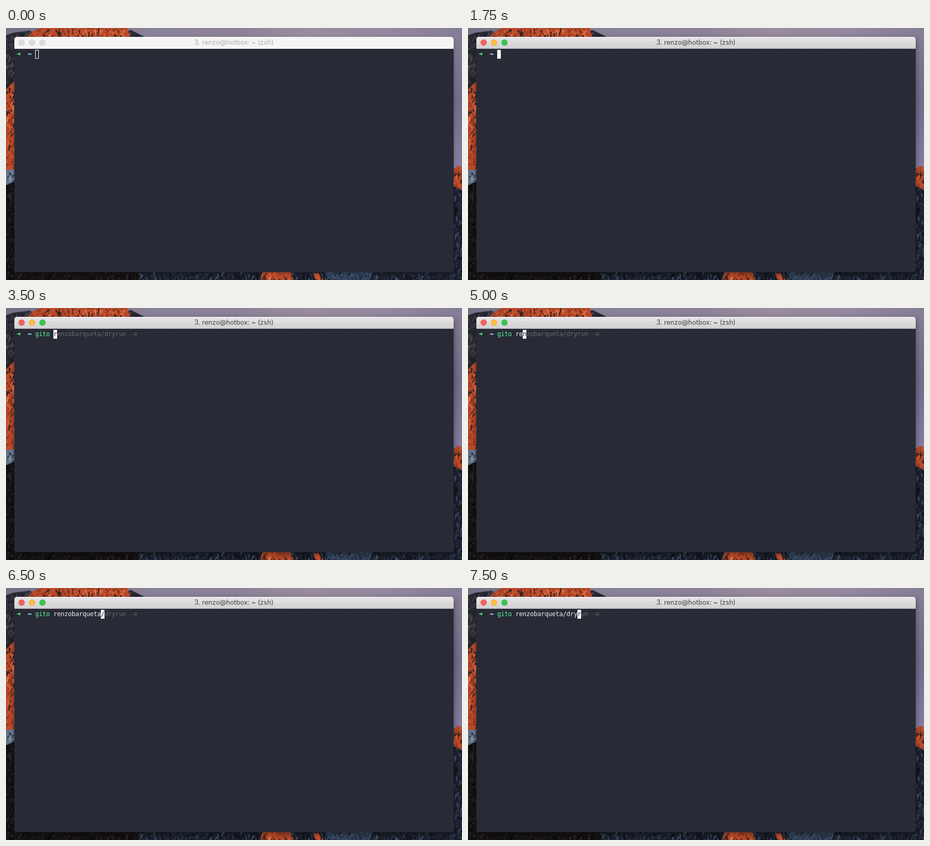
Write an HTML page with a canvas that moves like this. It is 875 by 484 pixels and loops after 8000 ms.

```html
<!DOCTYPE html>
<html lang="en">
<head>
<meta charset="utf-8">
<title>Terminal</title>
<style>
  html, body { margin: 0; width: 100%; height: 100%; overflow: hidden; background: #14161d; }
  #stage { position: relative; width: 875px; height: 484px; overflow: hidden; }
  #wall { position: absolute; left: 0; top: 0; }
  #win {
    position: absolute; left: 16px; top: 17px; width: 843px; height: 452px;
    border-radius: 5px 5px 4px 4px; background: #282a36; overflow: hidden;
  }
  #shade {
    position: absolute; left: 16px; top: 17px; width: 843px; height: 452px;
    border-radius: 5px; box-shadow: 0 2px 6px rgba(0, 0, 0, .3);
  }
  .focus #shade { box-shadow: 0 4px 12px rgba(0, 0, 0, .45); }
  #bar {
    box-sizing: border-box; height: 23px; background: #f6f5f6; border-bottom: 1px solid #f6f5f6;
    font: 12.7px/22px Inter, Roboto, sans-serif; color: #adacad; text-align: center; white-space: pre;
  }
  .focus #bar {
    background: linear-gradient(#e9e6e9, #d2d0d2); border-color: #b4b2b4;
    box-shadow: inset 0 1px #f4f2f4; color: #434243;
  }
  #bar i {
    position: absolute; top: 5px; width: 12px; height: 12px; border-radius: 50%;
    background: #dddcdd; box-shadow: inset 0 0 0 .5px #cfcecf;
  }
  #bar i:nth-of-type(1) { left: 8px; }
  #bar i:nth-of-type(2) { left: 28px; }
  #bar i:nth-of-type(3) { left: 48px; }
  .focus #bar i { box-shadow: inset 0 0 0 .5px rgba(0, 0, 0, .15); }
  .focus #bar i:nth-of-type(1) { background: #ee635c; }
  .focus #bar i:nth-of-type(2) { background: #fcbd43; }
  .focus #bar i:nth-of-type(3) { background: #34c84b; }
  .row {
    position: absolute; top: 42px; height: 17px; white-space: pre; color: #f1f1f0;
    font: 12px/17px "DejaVu Sans Mono", "Liberation Mono", monospace;
  }
  .row b { font-weight: 700; -webkit-text-stroke: .35px; }
  #arrow { left: 21px; color: #5af78e; }
  #home { left: 42px; color: #9aedfe; }
  #line { left: 56px; }
  #cmd { color: #5af78e; }
  #hint { color: #686868; }
  #caret {
    display: inline-block; box-sizing: border-box; width: 7px; height: 17px;
    vertical-align: top; color: #282a36; box-shadow: inset 0 0 0 1px #fff;
  }
  .focus #caret { background: #f6f6f6; box-shadow: none; }
  .typed #caret { background: #fff; }
  #mouse { position: absolute; width: 12px; height: 18px; display: none; }
</style>
</head>
<body>
<div id="stage">
  <canvas id="wall" width="875" height="484"></canvas>
  <div id="shade"></div>
  <div id="win">
    <div id="bar"><i></i><i></i><i></i>3. renzo@hotbox: ~ (zsh)</div>
  </div>
  <div class="row" id="arrow"><b>➜</b></div>
  <div class="row" id="home"><b>~</b></div>
  <div class="row" id="line"><span id="cmd"></span><span id="arg"></span><span id="caret"> </span><span id="hint"></span></div>
  <svg id="mouse" viewBox="0 0 12 18">
    <path d="M.5 .7V15.2L3.9 12.1 6.2 17.3 8.6 16.2 6.4 11.2H11.2Z" fill="#000" stroke="#fff" stroke-width="1"/>
  </svg>
</div>
<script>
const LOOP = 8000, CELL = 7, FOCUS_AT = 1750;
const $ = id => document.getElementById(id);

// ---- mountain wallpaper, visible only around the window ----
const ctx = $("wall").getContext("2d");
let seed = 41;
const rnd = () => (seed = (seed * 16807) % 2147483647) / 2147483647;

function fade(x, y, w, h, across, colors) {
  const g = ctx.createLinearGradient(x, y, across ? x + w : x, across ? y : y + h);
  colors.forEach((c, i) => g.addColorStop(i / (colors.length - 1), c));
  ctx.fillStyle = g;
  ctx.fillRect(x, y, w, h);
}

// A face of rock: flat outline roughened by slanted shards
function rock(outline, [base, ...tones]) {
  const pts = outline.split(" ").map(p => p.split(",").map(Number));
  const face = new Path2D("M" + outline + "Z");
  const xs = pts.map(p => p[0]), ys = pts.map(p => p[1]);
  const x = Math.min(...xs), y = Math.min(...ys);
  const w = Math.max(...xs) - x, h = Math.max(...ys) - y;
  ctx.fillStyle = base;
  ctx.fill(face);
  for (let i = 0; i < w * h / 16; i++) {
    const px = x + rnd() * w, py = y + rnd() * h;
    const size = .5 + rnd() * rnd() * 1.8;
    const len = size * (4 + rnd() * 5), lean = size * (3 - rnd() * 7), thick = size * 2.5;
    ctx.fillStyle = tones[Math.floor(rnd() * tones.length)];
    if (!ctx.isPointInPath(face, px, py)) continue;
    ctx.beginPath();
    ctx.moveTo(px, py);
    ctx.lineTo(px + thick, py + 1);
    ctx.lineTo(px + lean + thick / 2, py + len * .7);
    ctx.lineTo(px + lean, py + len);
    ctx.fill();
  }
}

const EMBER = ["#b84a2a", "#dc5e30", "#c94e28", "#8f3a24", "#4a2824", "#e07a50", "#2c2026"];
const DUSK = ["#2b2b34", "#1d1e26", "#3f3f4a", "#24252d", "#50505c"];
const SNOW = ["#66748a", "#8592a8", "#4c586e", "#2c3342"];
const SLATE = ["#1c212d", "#14171f", "#2c3648", "#40506a", "#10121a"];
const FROST = ["#34435a", "#4a5e7a", "#263146", "#171c28", "#3c4e68"];
const COAL = ["#151213", "#0b0a0b", "#221b1a", "#110f10", "#2b2422"];

fade(0, 0, 875, 20, true, ["#756f86", "#807990", "#8a8298", "#8b8298", "#9a8c9f", "#93889f", "#857d96"]);
fade(859, 14, 16, 256, false, ["#857d96", "#7b748f", "#716d8a", "#7b7596", "#877ea2"]);

rock("0,14 14,9 46,5 60,18 18,102 0,120", DUSK);
rock("0,118 18,100 18,274 0,274", EMBER);
rock("0,272 18,272 18,296 0,304", SNOW);
rock("0,302 18,294 18,470 256,468 262,484 0,484", COAL);
rock("226,6 240,4 268,18 226,18", DUSK);
rock("40,18 52,6 66,0 234,0 238,18", EMBER);
rock("858,272 868,264 875,268 875,312 858,304", EMBER);
rock("858,303 875,311 875,484 700,484 700,469 858,469", SLATE);
rock("254,468 494,468 488,484 258,484", SLATE);
rock("608,468 704,468 698,484 614,484", FROST);
rock("546,468 612,468 616,484 552,484", SLATE);
rock("492,468 546,468 552,484 488,484", EMBER);
rock("590,472 600,470 606,484 594,484", EMBER);

// ---- terminal ----
const COMMAND = "gito renzobarqueta/dryrun -e";
const GUESSES = { 1: "gito", 3: "git checkout develop" };
// [time, characters typed]
const KEYS = [
  [0, 0], [3000, 1], [3250, 3], [3500, 5], [5000, 7], [5250, 9], [5500, 10], [5750, 12],
  [6000, 14], [6250, 16], [6500, 18], [7000, 19], [7250, 20], [7500, 22]
];
// [from, to, x, y]
const POINTER = [[500, 750, 782, 305], [750, 1000, 542, 481]];

// Snap the monospace advance to the terminal grid
function snapGrid() {
  const line = $("line"), arg = $("arg");
  arg.textContent = "m".repeat(50);
  const advance = arg.getBoundingClientRect().width / 50;
  line.style.letterSpacing = (CELL - advance) + "px";
  arg.textContent = "";
}

function showLine(n) {
  const full = n ? GUESSES[n] || COMMAND : "";
  $("cmd").textContent = full.slice(0, Math.min(n, 4));
  $("arg").textContent = full.slice(4, Math.max(n, 4));
  $("caret").textContent = full[n] || " ";
  $("hint").textContent = full.slice(n + 1);
}

let shown = -1;
function draw(t) {
  const n = KEYS.filter(k => k[0] <= t).pop()[1];
  if (n !== shown) showLine(shown = n);
  $("stage").className = (t >= FOCUS_AT ? "focus" : "") + (n ? " typed" : "");
  const spot = POINTER.find(p => t >= p[0] && t < p[1]);
  const mouse = $("mouse").style;
  mouse.display = spot ? "block" : "none";
  if (spot) {
    mouse.left = spot[2] + "px";
    mouse.top = spot[3] + "px";
  }
}

snapGrid();
const start = performance.now();
function tick() {
  draw((performance.now() - start) % LOOP);
  requestAnimationFrame(tick);
}
tick();
</script>
</body>
</html>
```
